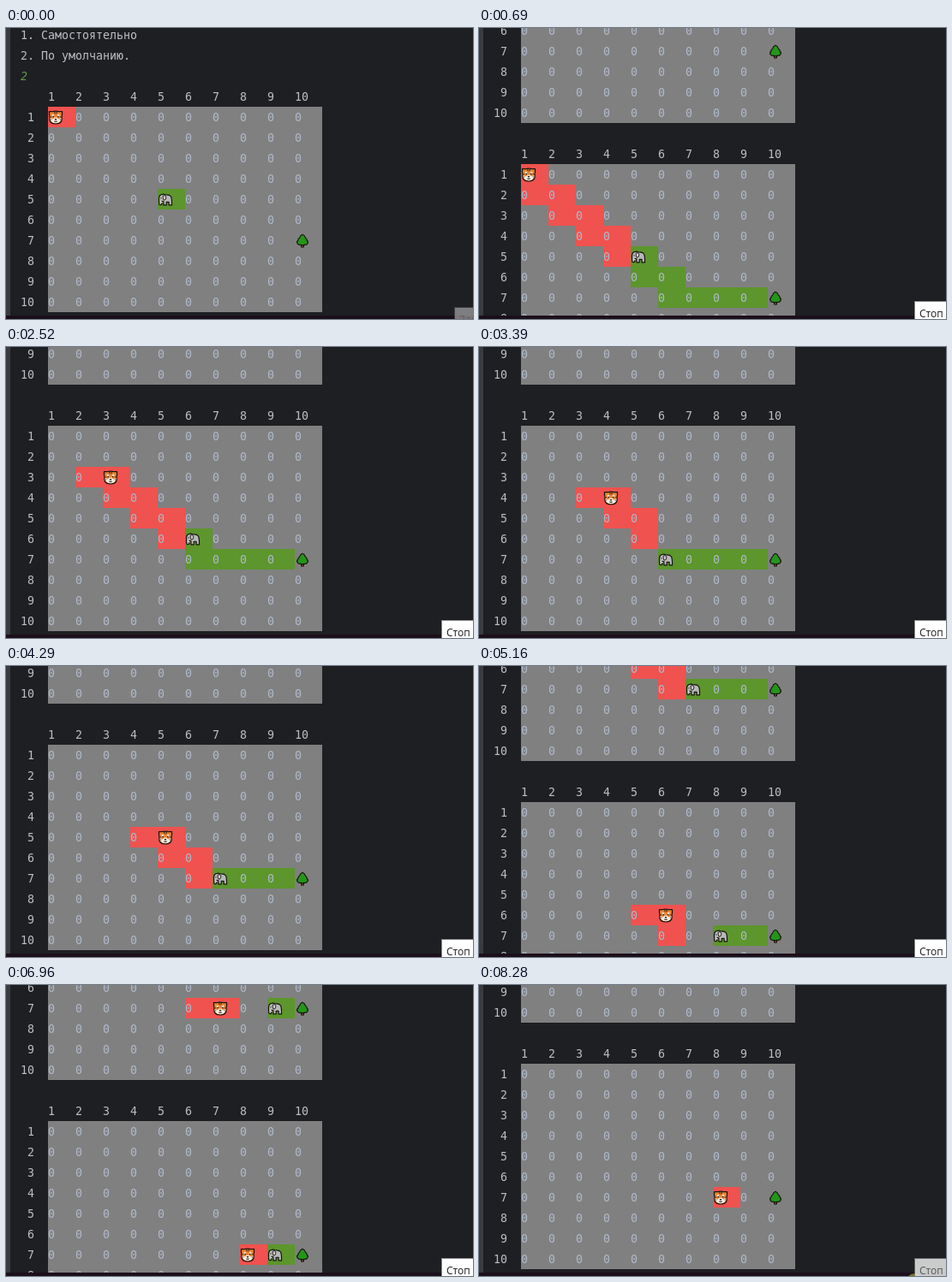
Animation of 545 by 340 pixels, one loop 8310 ms. Source, as an HTML page with a canvas:

```html
<!DOCTYPE html>
<html lang="ru">
<head>
<meta charset="utf-8">
<style>
  html, body { margin: 0; width: 100%; height: 100%; overflow: hidden; background: #1e1f22; }
  canvas { display: block; width: 545px; height: 340px; }
</style>
</head>
<body>
<canvas id="stage"></canvas>
<script>
const W = 545, H = 340, LOOP = 8310;
const LEFT = 49, CELL = 32, LINE = 24, SIZE = 10;
const HEADER_Y = 80, BOARD_STEP = 12 * LINE;
const MONO = '13.29px "DejaVu Sans Mono", monospace';
const RED = '#f0524f', GREEN = '#5c962c', INK = '#bcbec4', ZERO = '#aeb8ca';

const canvas = document.getElementById('stage');
const ctx = canvas.getContext('2d');
const ratio = window.devicePixelRatio || 1;
canvas.width = W * ratio;
canvas.height = H * ratio;

// Routes as [row, column]
const hunt = [[1, 1], [2, 1], [2, 2], [3, 2], [3, 3], [4, 3], [4, 4], [5, 4],
  [5, 5], [6, 5], [6, 6], [7, 6], [7, 7], [7, 8]];
const escape = [[5, 5], [6, 5], [6, 6], [7, 6], [7, 7], [7, 8], [7, 9]];
const tree = [7, 10];

// Route indices: tiger, red from/to, elephant (-1 when caught), green to
const turns = [
  [0, 0, 0, 0, 0],
  [0, 0, 7, 0, 6],
  [2, 1, 8, 1, 6],
  [4, 3, 9, 2, 6],
  [6, 5, 9, 3, 6],
  [8, 7, 11, 4, 6],
  [10, 9, 11, 5, 6],
  [12, 11, 12, 6, 6],
  [13, 13, 13, 6, 6],
  [13, 13, 13, -1, -1]
].map(([tiger, redFrom, redTo, elephant, greenTo]) => ({
  tiger: hunt[tiger],
  red: hunt.slice(redFrom, redTo + 1),
  elephant: escape[elephant],
  green: elephant < 0 ? [] : escape.slice(elephant, greenTo + 1)
}));

const turnStart = i => i ? 660 + (i - 1) * 900 : 0;
const cellX = col => LEFT + (col - 1) * CELL;

function text(str, x, midY, color, font = MONO) {
  ctx.font = font;
  ctx.fillStyle = color;
  ctx.fillText(str, x, midY + 5);
}

function rect(x, y, w, h, color) {
  ctx.fillStyle = color;
  ctx.fillRect(x, y, w, h);
}

function shape(d, fill, width = 1.2, stroke = '#17130f') {
  const path = new Path2D(d);
  if (fill) {
    ctx.fillStyle = fill;
    ctx.fill(path);
  }
  if (width) {
    ctx.lineWidth = width;
    ctx.strokeStyle = stroke;
    ctx.stroke(path);
  }
}

// Icons are drawn in a 17 by 16 box
function drawTiger() {
  shape('M1 1.2H4.5Q8.5 0 12.5 1.2H16V5Q15.4 6 15.6 8V11Q14.5 15.4 8.5 15.4Q2.5 15.4 1.4 11V8Q1.6 6 1 5Z', '#e98432');
  shape('M2.2 8.5L5.4 10L6.8 8.2H10.2L11.6 10L14.8 8.5V11Q13 14.7 8.5 14.7Q4 14.7 2.2 11Z', '#f6eee3', 0);
  shape('M4 5Q5.2 3.7 6.6 5V7H4.6ZM10.4 5Q11.8 3.7 13 5L12.4 7H10.4Z', '#f6eee3', 0);
  shape('M7 1.8V3.2M8.5 1.6V4M10 1.8V3.2M2 7.5H3.6M15 7.5H13.4M2.3 10.5H3.8M14.7 10.5H13.2', null, .8);
  shape('M5 6.2H6.4V7.8H5ZM10.6 6.2H12V7.8H10.6ZM7 9.5H10L8.5 11.2Z', '#17130f', 0);
  shape('M8.5 11V12.2M6.6 12.5Q8.5 13.7 10.4 12.5', null, .8);
}

function drawElephant() {
  shape('M1 7Q1 2 5 1.8Q7 1.3 8.3 2.5Q13 1.8 15 4.5Q16.2 7 16 14.4H12.6V10.8H9.7V14.4H6.4V10.3L4.5 9.8V12.7Q3.9 14.6 1.8 14L1.2 13Z', '#b9b9b9');
  shape('M5.6 3.6Q9.3 2.5 9.4 5.5Q9.3 8.8 6.5 8.7Q5.6 7 5.6 3.6Z', '#d0cfcf', .9);
  shape('M3 5.8H4V7H3Z', '#17130f', 0);
  shape('M2.4 10.3L5.4 11.5', null, 1, '#eeeeee');
}

function drawTree() {
  shape('M7 12H10V15.6H7Z', '#805430', 1);
  shape('M8.5 .8Q11 1.8 11.8 4.4Q13.8 5.7 13.7 7.7Q15.5 9 14.5 11Q13.4 13.3 10.5 12.8Q8.5 13.8 6.5 12.8Q3.6 13.3 2.5 11Q1.5 9 3.3 7.7Q3.2 5.7 5.2 4.4Q6 1.8 8.5 .8Z', '#24951b');
}

function icon(draw, [row, col], headerY) {
  ctx.save();
  ctx.translate(cellX(col) + .5, headerY + row * LINE - 7.5);
  ctx.lineJoin = 'round';
  draw();
  ctx.restore();
}

function drawBoard(turn, headerY) {
  const top = headerY + LINE / 2;
  const fill = (cells, color) => cells.forEach(([row, col]) =>
    rect(cellX(col), top + (row - 1) * LINE, CELL, LINE, color));
  const taken = [turn.tiger, turn.elephant, tree];
  const isTaken = (row, col) => taken.some(p => p && p[0] === row && p[1] === col);

  rect(LEFT, top, CELL * SIZE, LINE * SIZE, '#808080');
  fill(turn.red, RED);
  fill(turn.green, GREEN);
  for (let row = 1; row <= SIZE; row++) {
    const y = headerY + row * LINE;
    text(row, cellX(row), headerY, INK);
    text(row, row < 10 ? 25 : 17, y, INK);
    for (let col = 1; col <= SIZE; col++) {
      if (!isTaken(row, col)) text('0', cellX(col), y, ZERO);
    }
  }
  icon(drawTree, tree, headerY);
  if (turn.elephant) icon(drawElephant, turn.elephant, headerY);
  icon(drawTiger, turn.tiger, headerY);
}

// The console catches up with new output in one or two jumps
function scrollOffset(i, age) {
  if (!i) return 0;
  const jumps = i === 1 || i === 3 ? [163, 67] : [67];
  return jumps[Math.floor(age / 30)] || 0;
}

function drawConsole(t) {
  let i = turns.length - 1;
  while (t < turnStart(i)) i--;
  const y = HEADER_Y + scrollOffset(i, t - turnStart(i));
  if (i) {
    drawBoard(turns[i - 1], y - BOARD_STEP);
  } else {
    text('1. Самостоятельно', 17, 8, INK);
    text('2. По умолчанию.', 17, 32, INK);
    text('2', 17, 56, '#5f9a4b', 'italic ' + MONO);
  }
  drawBoard(turns[i], y);
}

function drawTip(label, x, y, alpha) {
  ctx.globalAlpha = alpha;
  rect(x, y, W - x, H - y, '#8a8a8a');
  rect(x + 1, y + 1, W - x, H - y, '#ffffff');
  text(label, x + 6, y + 14, '#1b1b1b', '12px "Open Sans", sans-serif');
  ctx.globalAlpha = 1;
}

function drawPointer() {
  ctx.fillStyle = '#77701f';
  ctx.beginPath();
  ctx.arc(508, 347, 10, 0, Math.PI * 2);
  ctx.fill();
}

function drawTips(t) {
  if (t < 30) return drawTip('Запуск', 523, 326, .32);
  if (t >= 8250) drawPointer();
  const alpha = t < 60 ? 0 : t < 90 ? .35 : t < 120 ? .7 : t < 8250 ? 1 : t < 8280 ? .85 : .66;
  if (alpha) drawTip('Стоп', 508, 319, alpha);
}

function render(t) {
  ctx.setTransform(ratio, 0, 0, ratio, 0, 0);
  rect(0, 0, W, H, '#1e1f22');
  rect(0, 0, 5, H, '#393b40');
  drawConsole(t);
  rect(0, 336, W, 4, '#1b0f1a');
  drawTips(t);
}

const start = performance.now();
function frame() {
  render((performance.now() - start) % LOOP);
  requestAnimationFrame(frame);
}
frame();
</script>
</body>
</html>
```
